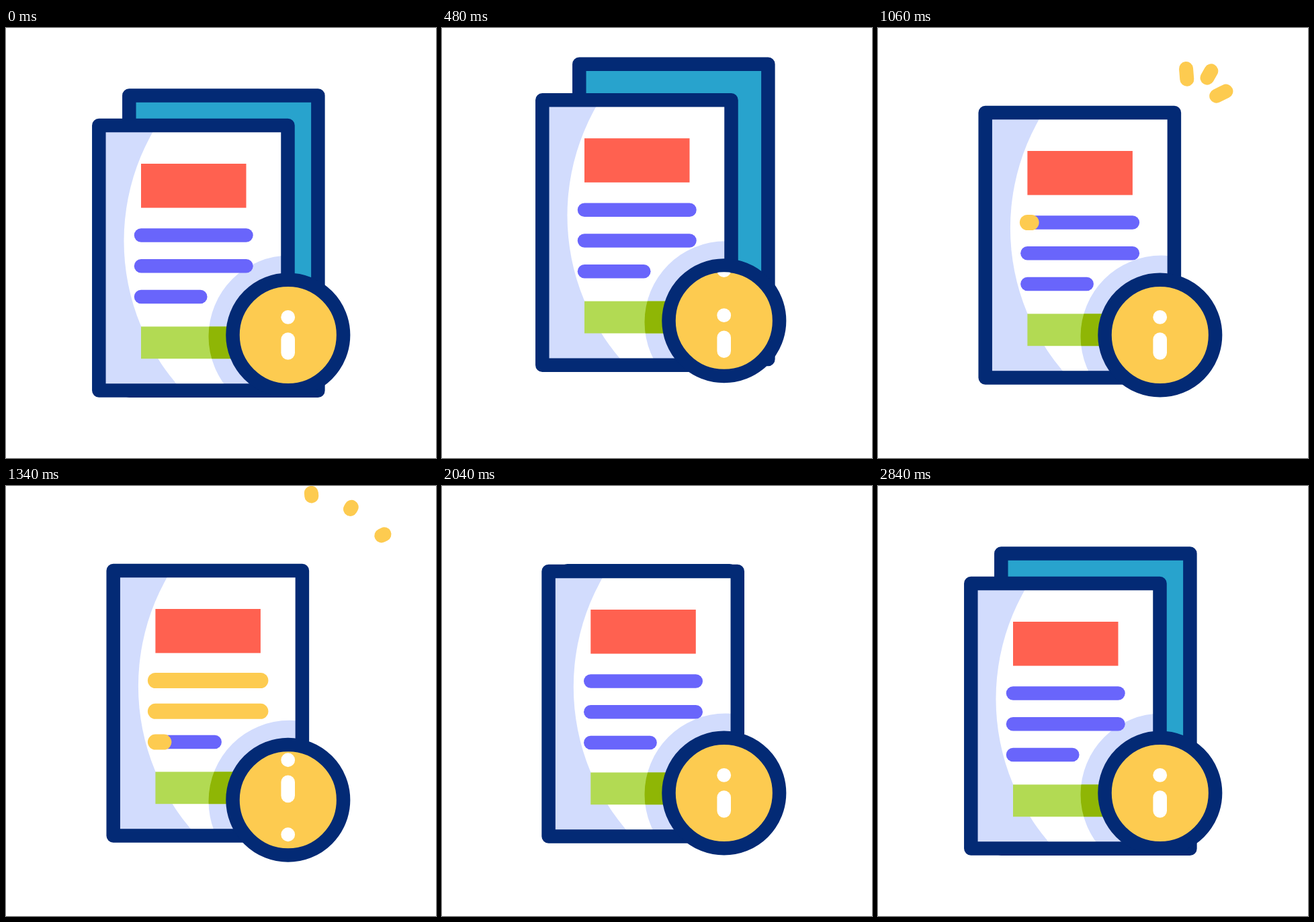
An HTML page that plays this animation: 640 px wide and 640 px high, repeating every 3.02 s.

```html
<!DOCTYPE html>
<html lang="en">
<head>
<meta charset="utf-8">
<title>Information document</title>
<style>
  html, body { margin: 0; width: 100%; height: 100%; overflow: hidden; background: #fff; }
  svg { display: block; width: 100vw; height: 100vh; }
  .edge { stroke: #032a75; stroke-width: 20.5; stroke-linejoin: round; }
  .line { stroke: #6965fb; stroke-width: 20.5; stroke-linecap: round; }
  .glow { stroke: #fdcb50; stroke-width: 23; }
  .spark { stroke: #fdcb50; stroke-width: 21; stroke-linecap: round; }
  .pale { fill: #d2dcfd; }
</style>
</head>
<body>
<svg viewBox="0 0 640 640">
  <defs>
    <rect id="page" x="138.3" y="145" width="281.2" height="394.5"/>
    <rect id="band" x="201" y="444.4" width="156.5" height="47.8"/>
    <clipPath id="pageClip"><use href="#page"/></clipPath>
    <clipPath id="shadeClip"><circle class="shade" r="120.5"/></clipPath>
    <clipPath id="badgeClip"><circle cx="419.8" cy="457" r="72.4"/></clipPath>
    <g id="info">
      <circle cx="419.7" cy="430.4" r="10.4" fill="#fff"/>
      <path d="M419.7 463.5V483.5" stroke="#fff" stroke-width="20.6" stroke-linecap="round"/>
    </g>
  </defs>

  <rect id="back" class="edge" fill="#28a3cd"/>

  <g id="front">
    <g clip-path="url(#pageClip)">
      <use href="#page" class="pale"/>
      <circle cx="503.5" cy="317" r="328" fill="#fff"/>
      <circle class="shade pale" r="120.5"/>
    </g>
    <rect x="201" y="202" width="156.5" height="65.6" fill="#ff6150"/>
    <use href="#band" fill="#b2da53"/>
    <g clip-path="url(#shadeClip)"><use href="#band" fill="#8fb605"/></g>
    <g id="lines"></g>
    <use href="#page" class="edge" fill="none"/>
  </g>

  <g id="sparks"></g>

  <g id="badge">
    <circle class="edge" cx="419.8" cy="457" r="82.3" fill="#fdcb50"/>
    <g clip-path="url(#badgeClip)">
      <use href="#info" id="infoOut"/>
      <use href="#info" id="infoIn"/>
    </g>
  </g>
</svg>

<script>
const LOOP = 3020;
const $ = id => document.getElementById(id);
const set = (el, attrs) => { for (const k in attrs) el.setAttribute(k, attrs[k]); };
const move = (el, x, y) => set(el, { transform: `translate(${x} ${y})` });
const mix = (a, b, k) => a + (b - a) * k;

// Eased progress from 0 to 1 over a span of time
function ease(t, start, dur) {
  const u = Math.min(1, Math.max(0, (t - start) / dur));
  return u * u * (3 - 2 * u);
}

function addLine(parent, cls) {
  const el = document.createElementNS('http://www.w3.org/2000/svg', 'line');
  el.setAttribute('class', cls);
  return parent.appendChild(el);
}

// Draws the part of a segment between two fractions
function trim({ el, x1, y1, x2, y2 }, from, to) {
  set(el, {
    x1: mix(x1, x2, from), y1: mix(y1, y2, from),
    x2: mix(x1, x2, to), y2: mix(y1, y2, to),
    visibility: to - from > 0.001 ? 'visible' : 'hidden'
  });
}

const lines = [0, 1, 2].map(i => {
  const y = 308.5 + 45.8 * i;
  const seg = { x1: 201, y1: y, x2: i < 2 ? 357.5 : 289.3, y2: y };
  trim({ el: addLine($('lines'), 'line'), ...seg }, 0, 1);
  return { el: addLine($('lines'), 'line glow'), start: 1042 + 130 * i, ...seg };
});

// Three rays fanned around an angle, the middle one shorter
function fan(x, y, angle, spread, start) {
  return [-1, 0, 1].map(i => {
    const a = (angle + spread * i) * Math.PI / 180;
    const near = i ? 41 : 51, far = i ? 111 : 103;
    return {
      el: addLine($('sparks'), 'spark'), start,
      x1: x + near * Math.cos(a), y1: y + near * Math.sin(a),
      x2: x + far * Math.cos(a), y2: y + far * Math.sin(a)
    };
  });
}
const sparks = [...fan(463.5, 121, -60.5, 34.2, 956), ...fan(169.4, 508, 138, 32.4, 2190)];

// Each roll swaps the sign for a copy one gap away
const rolls = [
  { start: 380, gap: 120 },
  { start: 1195, gap: -111 },
  { start: 2260, gap: -111 }
];

function draw(t) {
  // The pages jump up, tuck together, then spread back to rest
  const up = ease(t, 180, 305), tuck = ease(t, 485, 465), home = ease(t, 1930, 800);
  const pose = (rest, high, tucked) => mix(mix(mix(rest, high, up), tucked, tuck), rest, home);

  set($('back'), {
    x: pose(183.3, 204.3, 187), y: pose(100.4, 53.7, 127.6),
    width: pose(281.1, 281.1, 239), height: pose(439.3, 439.3, 377)
  });
  const fx = pose(0, 11, 21.4), fy = pose(0, -37.8, -19);
  move($('front'), fx, fy);

  const dip = ease(t, 1190, 160) - ease(t, 1350, 180);
  const by = -21.3 * (up - tuck) + 10.3 * dip;
  move($('badge'), 0, by);
  document.querySelectorAll('.shade').forEach(el => set(el, { cx: 422 - fx, cy: 459 + by - fy }));

  // The sign overshoots slightly before it settles
  const { start, gap } = rolls.findLast(r => t >= r.start) || rolls[0];
  const shift = gap * (1.063 * ease(t, start, 420) - 0.063 * ease(t, start + 420, 160));
  move($('infoOut'), 0, shift);
  move($('infoIn'), 0, shift - gap);

  for (const l of lines) trim(l, ease(t, l.start + 380, 165), ease(t, l.start, 165));
  for (const s of sparks) trim(s, ease(t, s.start + 48, 400), ease(t, s.start, 300));
}

const origin = performance.now();
function tick() {
  draw((performance.now() - origin) % LOOP);
  requestAnimationFrame(tick);
}
tick();
</script>
</body>
</html>
```
